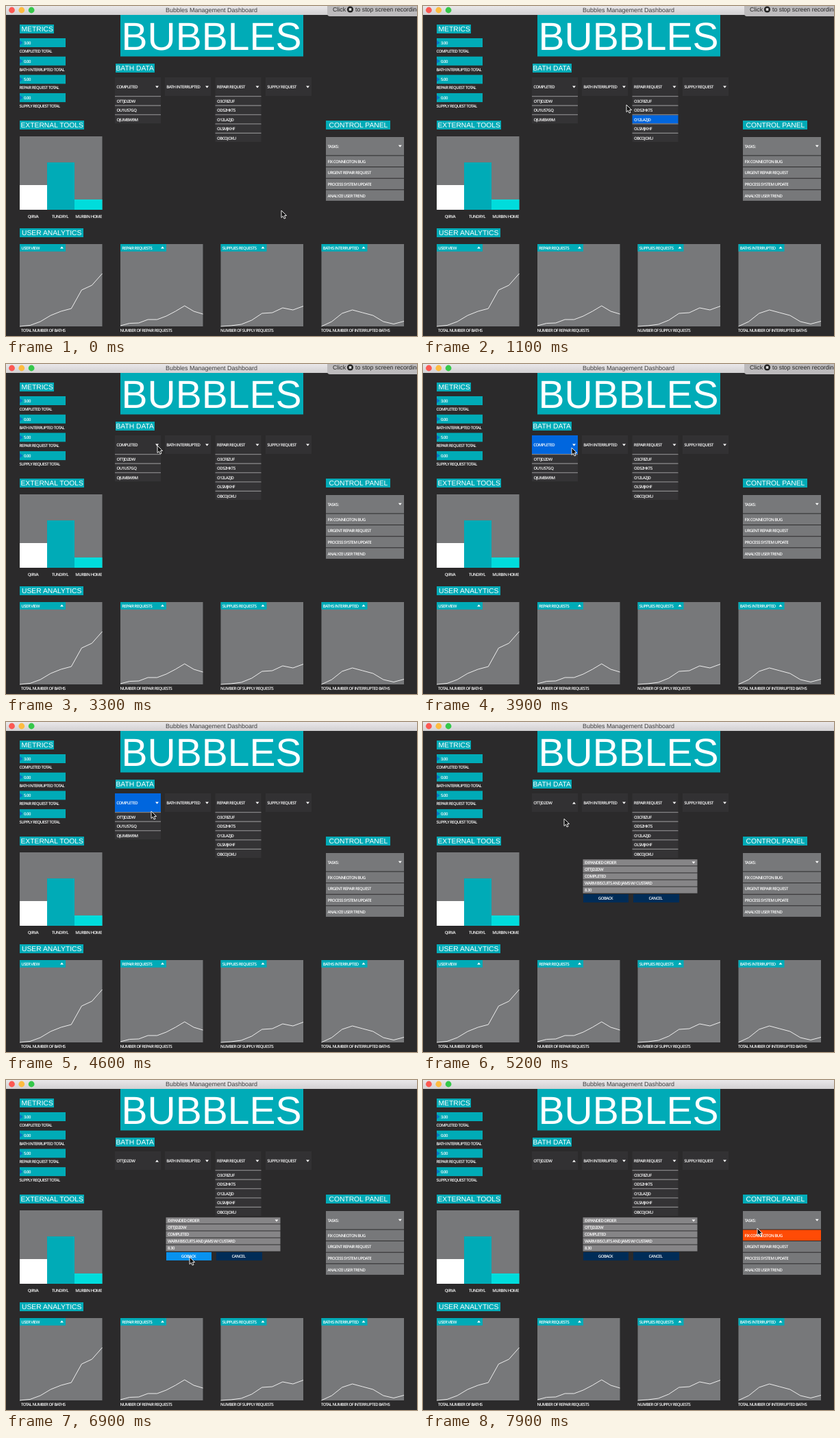
An HTML page with a canvas that plays this animation: 600x481 px, repeating every 8 s.

```html
<!DOCTYPE html>
<html lang="en">
<head>
<meta charset="utf-8">
<title>Bubbles Management Dashboard</title>
<style>
  html, body { margin: 0; width: 100%; height: 100%; overflow: hidden; background: #2b2a2b; }
  canvas { display: block; }
</style>
</head>
<body>
<canvas id="stage" width="600" height="481"></canvas>
<script>
const ctx = document.getElementById('stage').getContext('2d');
const LOOP = 8000, STEP = 100;
const TEAL = '#00abb7', GRAY = '#77787a', DARK = '#323133', HOVER = '#0066de';
const SANS = '"Liberation Sans", Arial, sans-serif';
const SMALL = '600 6px "Open Sans", sans-serif';

// Cursor stops: time, x, y
const PATH = [
  [0, 402, 298], [300, 398, 291], [1100, 297, 144], [1700, 262, 126], [2600, 238, 121],
  [3300, 221, 119], [3900, 217, 122], [4600, 212, 130], [5000, 206, 141], [5400, 206, 141],
  [6700, 267, 256], [6900, 268, 258], [7100, 269, 258], [7800, 481, 219], [7900, 488, 216], [8000, 490, 218]
];
const REPAIRS = ['O3CF8ZUF', 'ODS2HKTS', 'O12LAZJD', 'OLSMJKHF', 'OBCOJOXU'];
const DONE = ['OTTJD2DW', 'OU1US7GQ', 'OJUMBW9M'];
const ORDER = ['EXPANDED ORDER', 'OTTJD2DW', 'COMPLETED', 'WARM BISCUITS AND JAMS W/ CUSTARD', '8.30'];
const TASKS = ['FIX CONNECITON BUG', 'URGENT REPAIR REQUEST', 'PROCESS SYSTEM UPDATE', 'ANALYZE USER TREND'];
const METRICS = [['3.00', 'COMPLETED TOTAL'], ['0.00', 'BATH INTERRUPTED TOTAL'],
  ['5.00', 'REPAIR REQUEST TOTAL'], ['0.00', 'SUPPLY REQUEST TOTAL']];
const CHARTS = [
  [20, 'USER VIEW', 'TOTAL NUMBER OF BATHS', 22, [467, 465.5, 460, 451, 445, 441, 414, 407, 390]],
  [167, 'REPAIR REQUESTS', 'NUMBER OF REPAIR REQUESTS', 166.5, [466, 462.5, 462, 457, 457, 452, 445, 437, 445, 449]],
  [313.5, 'SUPPLIES REQUESTS', 'NUMBER OF SUPPLY REQUESTS', 313, [467, 466, 464, 458, 448, 447, 440, 443, 437.5]],
  [460.5, 'BATHS INTERRUPTED', 'TOTAL NUMBER OF INTERRUPTED BATHS', 460, [467, 460, 448, 443, 447, 451, 460, 463.5, 459.5]]
];

function rect(x, y, w, h, color) {
  ctx.fillStyle = color;
  ctx.fillRect(x, y, w, h);
}

function text(str, x, y, font = SMALL, color = '#fff', align = 'left') {
  ctx.font = font;
  ctx.letterSpacing = font === SMALL ? '-0.5px' : '0px';
  ctx.textRendering = 'geometricPrecision';
  ctx.textAlign = align;
  ctx.fillStyle = color;
  ctx.fillText(str, x, y);
}

function polygon(points, color) {
  ctx.beginPath();
  points.forEach(([x, y]) => ctx.lineTo(x, y));
  ctx.closePath();
  ctx.fillStyle = color;
  ctx.fill();
}

function disc(x, y, r, color) {
  ctx.beginPath();
  ctx.arc(x, y, r, 0, 7);
  ctx.fillStyle = color;
  ctx.fill();
}

// dir 1 points down, -1 points up
function caret(x, y, dir = 1) {
  const h = 1.5 * dir;
  polygon([[x - 2.5, y - h], [x + 2.5, y - h], [x, y + h]], '#fff');
}

function heading(str, x, y, w, textX) {
  rect(x, y, w, 13, TEAL);
  text(str, textX, y + 10.4, '10.3px ' + SANS);
}

function titleBar() {
  const shade = ctx.createLinearGradient(0, 0, 0, 13);
  shade.addColorStop(0, '#e9e7e9');
  shade.addColorStop(1, '#d2d0d2');
  rect(0, 0, 600, 13, shade);
  ['#fc5852', '#fdbc40', '#35c84a'].forEach((color, i) => disc(8.5 + i * 14.3, 6, 4.4, color));
  text('Bubbles Management Dashboard', 300, 9.3, '9px ' + SANS, '#3e3d3e', 'center');
}

function recordingTip(alpha) {
  if (alpha <= 0) return;
  ctx.globalAlpha = alpha;
  ctx.beginPath();
  ctx.roundRect(469, -8, 140, 23, 4);
  ctx.fillStyle = '#bdbbbd';
  ctx.fill();
  const font = '8.8px ' + SANS;
  text('Click', 477, 7.6, font, '#222');
  disc(502.5, 5, 4.6, '#222');
  rect(500.7, 3.2, 3.6, 3.6, '#ddd');
  text('to stop screen recording', 510, 7.6, font, '#222');
  ctx.globalAlpha = 1;
}

function metrics() {
  METRICS.forEach(([value, label], i) => {
    const y = 47 + i * 26.7;
    rect(20, y, 67, 13, TEAL);
    polygon([[20, y + 3], [24.5, y + 6.5], [20, y + 10]], '#0872c4');
    text(value, 26, y + 8.8);
    text(label, 19.5, y + 21);
  });
}

function tools() {
  rect(20, 190, 120.5, 107, GRAY);
  rect(20, 261, 40, 36, '#fff');
  rect(60, 228, 40, 69, TEAL);
  rect(100, 282, 40.5, 15, '#00dcdc');
  text('QIRVA', 39.5, 309, SMALL, '#fff', 'center');
  text('TUNDRYL', 79, 309, SMALL, '#fff', 'center');
  text('MURBIN HOME', 120.5, 309, SMALL, '#fff', 'center');
}

function dropdown(x, label, items, hovered, dir = 1) {
  rect(x, 104, 67, 27, hovered === 'header' ? HOVER : DARK);
  text(label, x + 2.3, 120);
  caret(x + 61.5, 118, dir);
  items.forEach((item, i) => {
    const y = 131 + i * 13.4;
    rect(x, y, 67, 1.5, '#858486');
    rect(x, y + 1.5, 67, 11.9, hovered === i ? HOVER : '#343335');
    text(item, x + 2.5, y + 10);
  });
}

function tasks(hovered) {
  rect(467, 191, 114, 26.5, GRAY);
  text('TASKS:', 469.5, 206.6);
  caret(575.3, 204.3);
  TASKS.forEach((task, i) => {
    const y = 218.5 + i * 16.6;
    rect(467, y, 114, 15.6, hovered && i === 0 ? '#ff4b06' : GRAY);
    text(task, 469.5, y + 10.3);
  });
}

function popup(hovered) {
  ORDER.forEach((row, i) => {
    const y = 200.3 + i * 10.05;
    rect(233.5, y, 167, 9.1, '#868587');
    text(row, 236, y + 6.9);
  });
  caret(395, 205);
  rect(234, 251, 66, 12, hovered ? '#0892ef' : '#002c57');
  rect(307, 251, 67, 12, '#002c57');
  text('GOBACK', 266.5, 258.8, SMALL, '#fff', 'center');
  text('CANCEL', 339.5, 258.8, SMALL, '#fff', 'center');
}

function chart([x, tab, caption, captionX, values]) {
  rect(x, 347, 120.5, 120, GRAY);
  rect(x, 347, 67, 10.8, TEAL);
  text(tab, x + 2.3, 354.5);
  caret(x + 61.5, 352, -1);
  ctx.beginPath();
  values.forEach((y, i) => ctx.lineTo(x + 120.5 * i / (values.length - 1), y));
  ctx.strokeStyle = '#eee';
  ctx.lineWidth = 1;
  ctx.stroke();
  text(caption, captionX, 475);
}

function cursor(t) {
  const next = PATH.findIndex(stop => stop[0] > t);
  const [t0, x0, y0] = PATH[next - 1], [t1, x1, y1] = PATH[next];
  const k = (t - t0) / (t1 - t0);
  ctx.save();
  ctx.translate(x0 + (x1 - x0) * k, y0 + (y1 - y0) * k);
  polygon([[0, 0], [0, 10.5], [2.4, 8.3], [4.1, 12], [6, 11.2], [4.4, 7.6], [7.6, 7.5]], '#111');
  ctx.strokeStyle = '#fff';
  ctx.lineWidth = 0.9;
  ctx.stroke();
  ctx.restore();
}

function draw(now) {
  const t = Math.floor(now % LOOP / STEP) * STEP;
  const during = (from, to) => t >= from && t < to;
  const opened = t >= 5000;

  rect(0, 0, 600, 481, '#2b2a2b');
  titleBar();
  recordingTip(Math.min(1, (4600 - t) / 300));

  rect(167, 13, 267, 60.5, TEAL);
  text('BUBBLES', 168.5, 64, '57px ' + SANS);
  heading('METRICS', 20, 27, 50, 22.5);
  heading('BATH DATA', 160, 84, 57, 160.5);
  heading('EXTERNAL TOOLS', 20, 167, 94, 21.5);
  heading('CONTROL PANEL', 467, 167, 94, 471.5);
  heading('USER ANALYTICS', 20, 324, 93, 23);

  metrics();
  tools();
  if (opened) dropdown(159, DONE[0], [], null, -1);
  else dropdown(159, 'COMPLETED', DONE, during(3600, 4800) ? 'header' : during(4800, 5000) ? 0 : null);
  dropdown(232, 'BATH INTERRUPTED', []);
  dropdown(305.5, 'REPAIR REQUEST', REPAIRS, during(1000, 1300) ? 2 : null);
  dropdown(379, 'SUPPLY REQUEST', []);
  tasks(t >= 7800);
  CHARTS.forEach(chart);
  if (opened) popup(during(6700, 7300));
  cursor(t);
}

const start = performance.now();
function tick() {
  draw(performance.now() - start);
  requestAnimationFrame(tick);
}
tick();
</script>
</body>
</html>
```
